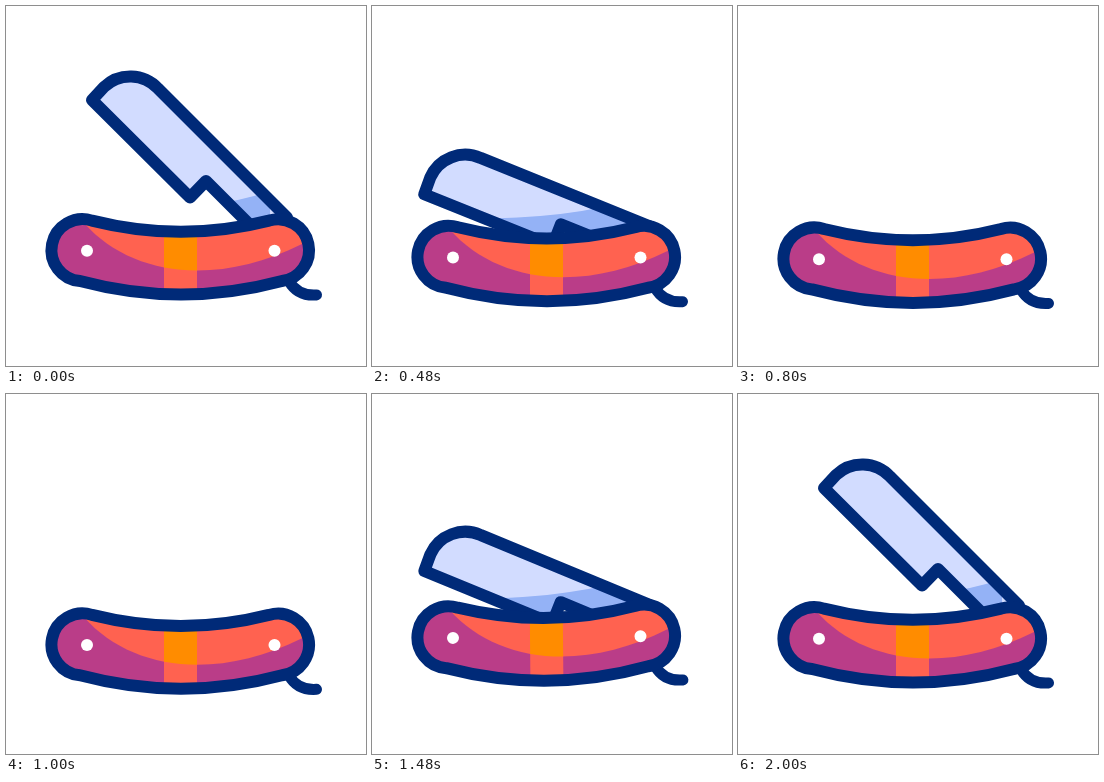
Write an HTML page that moves like this. It is 360 by 360 pixels and loops after 2.04 s.

```html
<!DOCTYPE html>
<html>
<head>
<meta charset="utf-8">
<style>
html, body { margin: 0; height: 100%; overflow: hidden; background: #fff; }
svg { display: block; width: 100vw; height: 100vh; }
.line { fill: none; stroke: #002a78; stroke-width: 12; stroke-linecap: round; stroke-linejoin: round; }
</style>
</head>
<body>
<svg viewBox="0 0 360 360">
  <defs>
    <path id="bladeShape" d="M245 220 L200 175 L184 191.5 L86 94 L98 81 A38 38 0 0 1 152 82.5 L281 211.5"/>
    <path id="handleShape" d="M74 275 A31 31 0 1 1 86 214.6 Q175 237 263 214.6 A31 31 0 1 1 276 275 Q175 302 74 275 Z"/>
    <path id="lightShape" d="M78 217 C125 270 210 281 296 238 V200 H78 Z"/>
    <clipPath id="inBlade"><use class="turn" href="#bladeShape"/></clipPath>
    <clipPath id="inHandle"><use href="#handleShape"/></clipPath>
    <clipPath id="inLight"><use href="#lightShape"/></clipPath>
    <clipPath id="aboveHandle"><path d="M0 -20 H360 V250 H0 Z"/></clipPath>
  </defs>
  <g id="dots" fill="#ff8f0c"><circle/><circle/><circle/></g>
  <g id="razor">
    <g id="blade" clip-path="url(#aboveHandle)">
      <use class="turn" href="#bladeShape" fill="#d2dcff"/>
      <path d="M40 205 Q190 211 264 185 V260 H40 Z" fill="#94b2f6" clip-path="url(#inBlade)"/>
      <use class="turn line" href="#bladeShape"/>
    </g>
    <path class="line" style="stroke-width:11" d="M283 275 C288 284 296 290 310.5 289"/>
    <g clip-path="url(#inHandle)">
      <path d="M40 200 H310 V300 H40 Z" fill="#ba3d88"/>
      <use href="#lightShape" fill="#ff6250"/>
      <path d="M158 200 H191 V300 H158 Z" fill="#ff6250"/>
      <path d="M158 200 H191 V300 H158 Z" fill="#ff8c00" clip-path="url(#inLight)"/>
    </g>
    <use class="line" href="#handleShape"/>
    <circle cx="81" cy="244.8" r="6" fill="#fff"/>
    <circle cx="268.5" cy="244.8" r="6" fill="#fff"/>
  </g>
</svg>
<script>
const LOOP = 2040, STEP = 40;
const $ = id => document.getElementById(id);
const turning = document.querySelectorAll('.turn');
const dots = [...$('dots').children];

// [time, value] pairs
const drop = [[80, 0], [160, .5], [240, 1.5], [320, 3], [400, 5], [480, 6.7], [560, 8], [640, 8.6], [720, 8.6],
  [800, 8.4], [900, 7.6], [1000, 6.3], [1100, 4.6], [1200, 2.5], [1320, -.8], [1440, -1.8], [1680, -1.8], [1840, -.8], [2000, 0]];
const tilt = [[1320, 0], [1500, -.6], [1680, -.6], [2000, 0]];
const fold = [[80, 0], [160, .8], [240, 3.3], [320, 7.3], [400, 14], [480, 23], [600, 38], [720, 54],
  [1330, 54], [1400, 41], [1480, 22], [1560, 8], [1620, 2], [1670, 0]];
const dotSize = [[1920, 6], [1960, 4.5], [2000, 0]];

// Spark directions from their common origin
const origin = [125, 105];
const rays = [[-50, -30], [-13, -55], [35.5, -46.5]];

function at(keys, t) {
  const i = keys.findIndex(k => k[0] > t);
  if (i === 0) return keys[0][1];
  if (i < 0) return keys[keys.length - 1][1];
  const [t0, a] = keys[i - 1], [t1, b] = keys[i];
  return a + (b - a) * (t - t0) / (t1 - t0);
}

function draw(t) {
  $('razor').setAttribute('transform', `translate(0 ${at(drop, t)}) rotate(${at(tilt, t)} 180 245)`);

  const angle = at(fold, t);
  const slide = Math.min(20, angle * .5) * Math.SQRT1_2;
  for (const el of turning)
    el.setAttribute('transform', `rotate(${-angle} 268.5 244.8) translate(${slide} ${slide})`);
  $('blade').style.display = angle < 54 ? '' : 'none';

  const spread = 1 + (t - 1680) / 412;
  dots.forEach((dot, i) => {
    dot.setAttribute('cx', origin[0] + rays[i][0] * spread);
    dot.setAttribute('cy', origin[1] + rays[i][1] * spread);
    dot.setAttribute('r', t < 1600 ? 0 : at(dotSize, t));
  });
}

const start = performance.now();
function tick() {
  const t = (performance.now() - start) % LOOP;
  draw(Math.floor(t / STEP) * STEP);
  requestAnimationFrame(tick);
}
tick();
</script>
</body>
</html>
```
